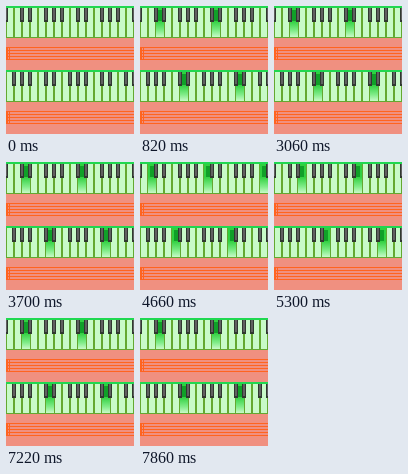
Write an HTML page with a canvas that moves like this. It is 128 by 128 pixels and loops after 8 s.

```html
<!DOCTYPE html>
<html>
<head>
<meta charset="utf-8">
<style>
html, body { margin: 0; width: 100%; height: 100%; overflow: hidden; background: #f09080; }
canvas { display: block; width: 128px; height: 128px; image-rendering: pixelated; }
</style>
</head>
<body>
<canvas id="stage" width="128" height="128"></canvas>
<script>
const ctx = document.getElementById('stage').getContext('2d');
const LOOP = 8000, START = 500, BEAT = 320;
const SCALE = 'CDEFGAB';
const TUNE = 'CDECDEGEDCDED';
const SHARP_ON_RIGHT = 'CDFGA';
const EDGE = '#64a830', STAFF = '#ff6420';
// Each row of keys starts at a different note of the scale.
const ROWS = [{ y: 0, first: 6 }, { y: 64, first: 3 }];

function rect(color, x, y, w, h) {
  ctx.fillStyle = color;
  ctx.fillRect(x, y, w, h);
}

function glow(y) {
  const fill = ctx.createLinearGradient(0, y + 15, 0, y + 31);
  fill.addColorStop(0, '#30d040');
  fill.addColorStop(0.6, '#80ec88');
  fill.addColorStop(1, '#c8fac8');
  return fill;
}

function whiteKey(x, y, pressed) {
  rect('#c8fac8', x, y + 2, 8, 29);
  rect(EDGE, x, y + 2, 1, 29);
  rect(EDGE, x + 7, y + 2, 1, 29);
  rect(EDGE, x, y + 31, 8, 1);
  if (pressed) {
    rect(glow(y), x, y + 2, 8, 29);
    rect('#10a028', x + 2, y + 4, 4, 11);
  }
}

function blackKey(x, y) {
  rect('#303830', x - 2, y + 2, 4, 14);
  rect('#606060', x - 1, y + 2, 2, 12);
}

function staff(y) {
  for (let i = 0; i < 5; i++) rect(STAFF, 0, y + 41 + i * 3, 128, 1);
  rect(STAFF, 0, y + 41, 2, 13);
  rect(STAFF, 3, y + 41, 1, 13);
}

function drawRow({ y, first }, note) {
  const nameAt = i => SCALE[(first + i + 7) % 7];
  for (let i = 0; i < 16; i++) whiteKey(i * 8, y, nameAt(i) === note);
  for (let i = 0; i <= 16; i++) {
    if (SHARP_ON_RIGHT.includes(nameAt(i - 1))) blackKey(i * 8, y);
  }
  rect('#20d850', 0, y, 128, 2);
  staff(y);
}

function noteAt(time) {
  if (time < START) return null;
  return TUNE[Math.floor((time - START) / BEAT) % TUNE.length];
}

function draw() {
  const note = noteAt(performance.now() % LOOP);
  rect('#f09080', 0, 0, 128, 128);
  for (const row of ROWS) drawRow(row, note);
  requestAnimationFrame(draw);
}
draw();
</script>
</body>
</html>
```
